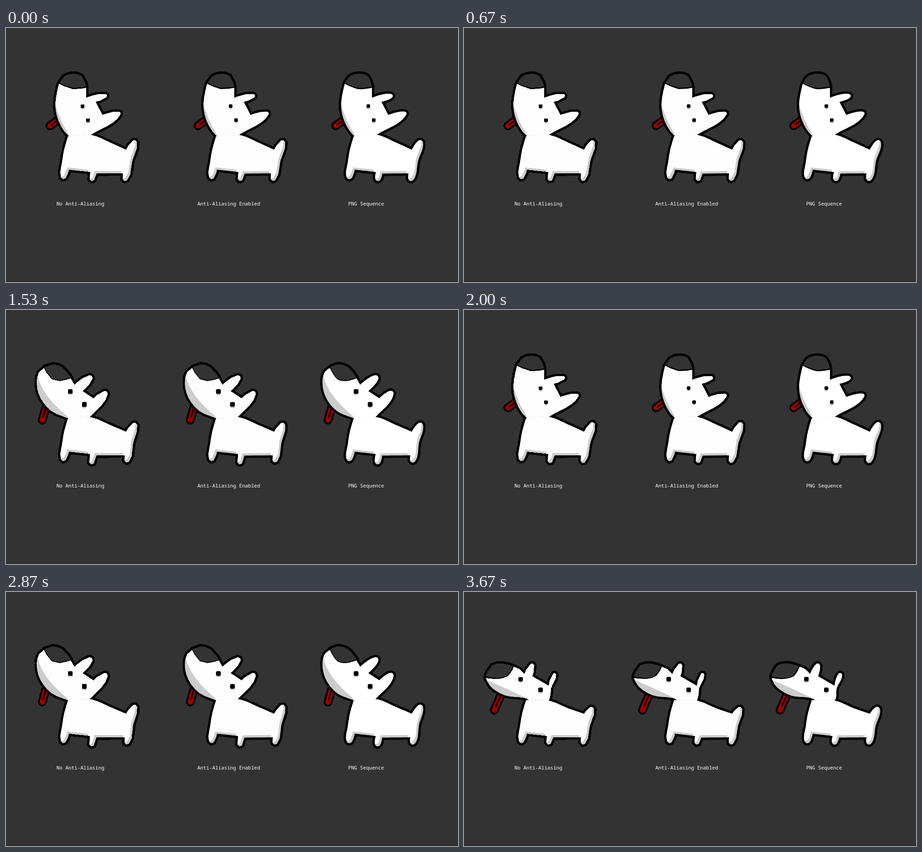
Animation, 998 px wide and 561 px high, one loop 3790 ms. Source, as an HTML page:

```html
<!DOCTYPE html>
<html lang="en">
<head>
<meta charset="utf-8">
<title>Anti-aliasing comparison</title>
<style>
  html, body { margin: 0; width: 100%; height: 100%; overflow: hidden; background: #333; }
  svg { display: block; }
  text { font: 500 11px "Roboto Mono", "Noto Sans Mono", monospace; fill: #fff; white-space: pre; }
</style>
</head>
<body>
<svg id="stage" width="998" height="561" viewBox="0 0 998 561"></svg>
<script>
const stage = document.getElementById('stage');

// Key points, clockwise. A third number marks a rounded tip (ear, tail, foot) and its half width.
const up = {
  head: [[117, 123], [147, 135], [177, 132], [177, 154], [223, 149, 3.5], [198, 163], [213, 192],
    [253, 187, 3.5], [189, 235], [165, 250], [138, 238], [116, 205], [109, 168]],
  nose: [[118, 121], [148, 132], [177, 129], [167, 106], [148, 101], [128, 107]],
  chin: 'M107,160Q116,200 138,234L95,225Z',
  tongue: [[112, 205], [97, 216]],
  eyes: [[169, 172.5], [181, 203.5]], eye: 8,
  neck: 236, tail: [286, 248], hind: [262, 338], middle: [189, 338]
};
const level = {
  head: [[84, 128], [101, 153], [118, 157], [143, 151], [151, 165], [190, 146, 5], [169, 179], [193, 195],
    [223, 180, 5], [190, 231], [165, 250], [137, 239], [100, 223], [76, 194], [68, 162], [73, 137]],
  nose: [[85, 126], [101, 151], [118, 155], [143, 149], [125, 127], [103, 120]],
  chin: 'M70,146Q80,190 137,236L60,250Z',
  tongue: [[88, 215], [80, 243]],
  eyes: [[142, 180], [173, 208.5]], eye: 10.5,
  neck: 237, tail: [286, 249], hind: [266, 337], middle: [188.5, 341]
};
const down = {
  head: [[48, 190], [75, 192], [98, 185], [110, 165], [122, 170], [133, 181], [152, 158, 4], [151, 186],
    [187, 207], [201, 179, 3.5], [192, 213], [188, 239], [165, 250], [137, 235], [90, 228], [58, 208]],
  nose: [[48, 186], [75, 190], [95, 184], [108, 164], [86, 158], [62, 162]],
  chin: 'M47,193Q92,212 137,234L60,245Z',
  tongue: [[82, 226], [67, 261]],
  eyes: [[125, 192.5], [169, 216]], eye: 10,
  neck: 240, tail: [284, 254], hind: [262, 337], middle: [186, 337]
};
const poses = [up, level, down];

const dogs = [
  { x: 0, white: '#fdfdfd', facet: 13, crisp: true },
  { x: 327, white: '#fdfdfd', facet: 13 },
  { x: 631, white: '#fff', facet: 2 }
];

const labels = [[111.4, 'No Anti-Aliasing'], [422.4, 'Anti-Aliasing Enabled'], [755.4, 'PNG Sequence']];

function add(parent, tag, attrs) {
  const el = document.createElementNS('http://www.w3.org/2000/svg', tag);
  for (const key in attrs) el.setAttribute(key, attrs[key]);
  parent.appendChild(el);
  return el;
}

const mix = (a, b, t) => [a[0] + (b[0] - a[0]) * t, a[1] + (b[1] - a[1]) * t];
const gap = (a, b) => Math.hypot(b[0] - a[0], b[1] - a[1]);
const unit = (x, y) => {
  const n = Math.hypot(x, y) || 1;
  return [x / n, y / n];
};

function torso({ neck, tail, hind, middle }) {
  const [hipX, hipY] = mix(tail, hind, 0.5);
  return [
    [188, neck], [230, neck + 17], [265, 269], [...tail, 5], [hipX + 5, hipY],
    [...hind, 5], [hind[0] - 4, 321], [middle[0] + 11, 321.5],
    [...middle, 5], [middle[0] - 3, 318], [139, 313],
    [126, 334, 5], [124, 295], [129, 266], [137, 239]
  ];
}

// Replaces each tip by two shoulders with the tip between them.
function roundTips(pts) {
  const n = pts.length;
  return pts.flatMap((p, i) => {
    const [x, y, w] = p;
    if (!w) return [p];
    const root = mix(pts[(i + n - 1) % n], pts[(i + 1) % n], 0.5);
    const [dx, dy] = unit(x - root[0], y - root[1]);
    const shoulder = side => [x - dx * w * 0.55 + side * dy * w, y - dy * w * 0.55 - side * dx * w];
    return [shoulder(1), [x, y], shoulder(-1)];
  });
}

// Direction of the curve at b, or zero where the outline turns sharply.
function tangent(a, b, c) {
  const u = unit(b[0] - a[0], b[1] - a[1]);
  const v = unit(c[0] - b[0], c[1] - b[1]);
  return u[0] * v[0] + u[1] * v[1] < 0.45 ? [0, 0] : unit(u[0] + v[0], u[1] + v[1]);
}

// Closed curve through the key points, cut into straight facets of the given length.
function outline(keys, facet) {
  const pts = roundTips(keys);
  const n = pts.length;
  const dirs = pts.map((p, i) => tangent(pts[(i + n - 1) % n], p, pts[(i + 1) % n]));
  const cut = pts.flatMap((p, i) => {
    const j = (i + 1) % n;
    const q = pts[j];
    const len = gap(p, q);
    const a = [p[0] + dirs[i][0] * len / 3, p[1] + dirs[i][1] * len / 3];
    const b = [q[0] - dirs[j][0] * len / 3, q[1] - dirs[j][1] * len / 3];
    const count = Math.max(1, Math.round(len / facet));
    return Array.from({ length: count }, (_, k) => {
      const t = k / count;
      const m = mix(a, b, t);
      return mix(mix(mix(p, a, t), m, t), mix(m, mix(b, q, t), t), t).map(v => v.toFixed(2));
    });
  });
  return 'M' + cut.join('L') + 'Z';
}

function drawTongue(g, [root, tip]) {
  const line = (a, b, color, width) => add(g, 'path', {
    d: `M${a}L${b}`, stroke: color, 'stroke-width': width, 'stroke-linecap': 'round'
  });
  line(root, tip, '#000', 19.5);
  line(root, tip, '#990000', 11.5);
  line(root, mix(root, tip, 0.75), '#000', 3.5);
}

function drawDog(parent, pose, dog, id) {
  const g = add(parent, 'g', {
    transform: `translate(${dog.x})`,
    'stroke-linejoin': 'round',
    'shape-rendering': dog.crisp ? 'crispEdges' : 'auto'
  });
  const head = outline(pose.head, dog.facet);
  const nose = outline(pose.nose, dog.facet);
  const body = outline(torso(pose), dog.facet);
  const fill = (to, d, color) => add(to, 'path', { d, fill: color });
  const clipped = (d, name) => {
    fill(add(g, 'clipPath', { id: name }), d, '#000');
    return add(g, 'g', { 'clip-path': `url(#${name})` });
  };

  drawTongue(g, pose.tongue);
  for (const d of [head, nose, body]) add(g, 'path', { d, stroke: '#000', 'stroke-width': 10.5 });
  fill(g, nose, '#333');
  fill(g, head, dog.white);
  fill(clipped(head, id + 'head'), pose.chin, '#ccc');

  // The light falls from the upper left, so a shifted copy leaves a shaded rim.
  fill(g, body, '#ccc');
  fill(clipped(body, id + 'body'), body, dog.white).setAttribute('transform', 'translate(-4 -5)');

  const size = pose.eye;
  for (const [x, y] of pose.eyes) {
    for (const [drop, color] of [[3, '#ccc'], [0, '#000']]) {
      add(g, 'rect', {
        x: x - size / 2, y: y - size / 2 + drop, width: size, height: size, rx: size * 0.3, fill: color
      });
    }
  }
}

add(stage, 'rect', { width: 998, height: 561, fill: '#333' });
add(stage, 'rect', { y: 560, width: 998, height: 1, fill: '#202020' });
const groups = poses.map((pose, p) => {
  const g = add(stage, 'g', {});
  dogs.forEach((dog, i) => drawDog(g, pose, dog, `p${p}d${i}`));
  return g;
});
for (const [x, label] of labels) add(stage, 'text', { x, y: 391.5 }).textContent = label;

// Six poses a second on a 15 fps grid, in 10 ms units; the first pose is one tick shorter.
const LOOP = 3790;
const swing = [0, 1, 2, 1];
const beat = k => Math.round((k === 1 ? 2 : Math.ceil(k * 2.5)) / 15 * 100) * 10;

let shown = -1;
function show(time) {
  const t = time % LOOP;
  let step = 0;
  while (beat(step + 1) <= t) step++;
  const next = swing[step % swing.length];
  if (next === shown) return;
  shown = next;
  groups.forEach((g, i) => g.setAttribute('display', i === next ? 'inline' : 'none'));
}

show(0);
const begin = performance.now();
function tick() {
  show(performance.now() - begin);
  requestAnimationFrame(tick);
}
requestAnimationFrame(tick);
</script>
</body>
</html>
```
